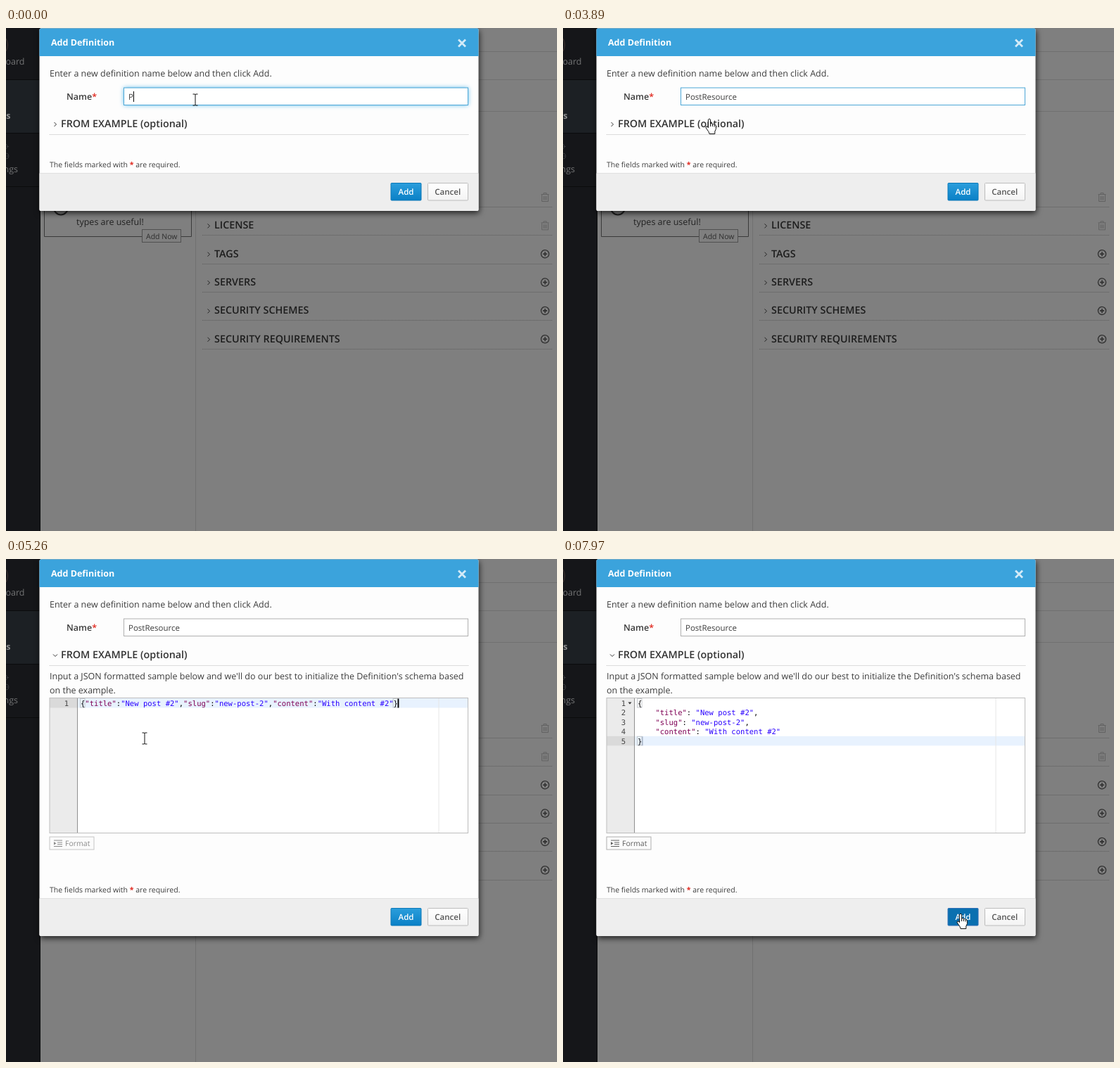
Recreate the animation shown at these times as an HTML page. Size 783x715 px, loop 8000 ms.

```html
<!DOCTYPE html>
<html lang="en">
<head>
<meta charset="utf-8">
<title>Add Definition</title>
<style>
  html, body { margin: 0; width: 783px; height: 715px; overflow: hidden; background: #7f7f7f; }
  svg { display: block; font: 12.5px "Open Sans", sans-serif; text-rendering: geometricPrecision; }
  .h { font-size: 14.35px; font-weight: 600; }
  .s { font-size: 10.5px; }
  .b { font-size: 11.5px; font-weight: 600; }
  .code { font: 10.55px "DejaVu Sans Mono", monospace; }
  .key { fill: #7f0055; }
  .str { fill: #2a00ff; }
  .line { fill: none; stroke-width: 1; }
  .dots { fill: none; stroke-dasharray: 1 1; }
  .req { fill: #e0261c; }
  #shade { filter: drop-shadow(1px 3px 4px rgba(0,0,0,.75)); }
  #glow { filter: drop-shadow(0 0 3px #4fb5ea); }
</style>
</head>
<body>
<svg width="783" height="715" viewBox="0 0 783 715">
  <defs>
    <linearGradient id="blue" x2="0" y2="1"><stop stop-color="#2b9edc"/><stop offset="1" stop-color="#0a80c6"/></linearGradient>
    <linearGradient id="pale" x2="0" y2="1"><stop stop-color="#fff"/><stop offset="1" stop-color="#f3f3f3"/></linearGradient>
    <clipPath id="fold"><rect id="foldBox" x="48" y="152" width="623" height="0"/></clipPath>
    <g id="trash" class="line" stroke="#626262">
      <path d="M-5.5-4H5.5M-2-4V-6H2V-4M-4.5-3.5V6H4.5V-3.5M-2-1.5V4M0-1.5V4M2-1.5V4"/>
    </g>
    <g id="plus" class="line" stroke="#2e2e2e">
      <circle r="5.6" stroke-width="1.3"/><path d="M-3 0H3M0-3V3" stroke-width="1.6"/>
    </g>
  </defs>

  <!-- dimmed page -->
  <rect width="783" height="715" fill="#7f7f7f"/>
  <g class="line" stroke="#717171">
    <path d="M670 33.5H783M670 73.5H783M670 118.5H783M269.5 250V715" stroke="#707070"/>
  </g>
  <g id="rows" fill="#1d1d1d"></g>
  <g class="line" stroke="#3a3a3a">
    <path d="M54.5 240V296.5H263.5V240"/>
    <circle cx="78" cy="255.500" r="10" stroke="#222" stroke-width="2"/>
  </g>
  <text x="100" y="280" fill="#222">types are useful!</text>
  <rect x="193.500" y="286.500" width="55" height="18" fill="#7f7f7f" stroke="#505050"/>
  <text class="s" x="199" y="299.500" fill="#2d2d2d">Add Now</text>

  <!-- sidebar -->
  <rect width="48.500" height="715" fill="#151619"/>
  <rect y="74" width="48" height="75" fill="#1c2024"/>
  <path class="line" stroke="#0a0b0c" d="M0 73.500H48M0 149.500H48M0 225.500H48M48.500 0V715"/>
  <g class="line" stroke="#403431" stroke-width="2">
    <path d="M0 15Q5 24 0 33"/>
    <path d="M0 165A4 4 0 0 1 0 172M0 178A4 4 0 0 1 0 186M1 168.500H4M1 182H4" stroke="#36383a"/>
  </g>
  <g text-anchor="end" fill="#737475">
    <text x="26.500" y="52">Dashboard</text>
    <text x="6.500" y="129" font-weight="700" fill="#8d8e8f">APIs</text>
    <text x="17" y="205">Settings</text>
  </g>

  <!-- dialog -->
  <rect id="shade" x="47.500" y="0.500" width="624" height="259.500" rx="2" fill="#fdfdfd"/>
  <path d="M47.500 40V3Q47.500 .5 50 .5H669Q671.500 .5 671.500 3V40Z" fill="#3ba3dc"/>
  <text x="64" y="25" font-weight="700" fill="#fff">Add Definition</text>
  <path d="M643 16.500L653 26.500M653 16.500L643 26.500" stroke="#d3ebf8" stroke-width="2.800"/>
  <g fill="#3c3c3c">
    <text x="62" y="69">Enter a new definition name below and then click Add.</text>
    <text x="86" y="102" font-weight="600">Name<tspan class="req">*</tspan></text>
    <rect id="glow" x="167.500" y="85" width="489" height="24.500" fill="#fff"/>
    <rect id="field" x="167.500" y="85" width="489" height="24.500" fill="#fff"/>
    <text id="name" x="174" y="102" font-size="11.500"></text>
    <path id="caret" d="M0 90V105" stroke="#000"/>
    <path id="chev" class="line" stroke="#333" stroke-width="1.300" d="M-1.500-3L1.500 0L-1.500 3"/>
    <text class="h" x="78" y="141" fill="#333">FROM EXAMPLE (optional)</text>
    <path class="dots" stroke="#bbb" d="M62 151.500H657"/>
  </g>

  <g clip-path="url(#fold)">
    <text x="62" y="171" fill="#3c3c3c">Input a JSON formatted sample below and we'll do our best to initialize the Definition's schema based</text>
    <text x="62" y="191" fill="#3c3c3c">on the example.</text>
    <rect x="62" y="197.500" width="594.500" height="192" fill="#fff"/>
    <rect x="62" y="197.500" width="40" height="192" fill="#ebebeb"/>
    <g id="active">
      <rect x="62" y="198" width="40" height="13.500" fill="#dadada"/>
      <rect x="102" y="198" width="554.500" height="13.500" fill="#e8f2fe"/>
    </g>
    <path class="line" stroke="#8f8f8f" d="M101.500 198V389"/>
    <path class="line" stroke="#e6e6e6" d="M615 198V389"/>
    <g id="editor" class="code"></g>
    <path id="codeCaret" d="M0 198.500V211.500"/>
    <rect x="62" y="197.500" width="594.500" height="192" fill="none" stroke="#bdbdbd"/>
    <g id="format">
      <rect x="62" y="395" width="63" height="18" stroke="#c2c2c2"/>
      <path class="line" stroke-width="1.400" d="M68 400H80M73 403H80M73 405.700H80M68 408.500H80"/>
      <path stroke="none" d="M68 402L71.500 404.300L68 406.600Z"/>
      <text class="s" stroke="none" x="84" y="408">Format</text>
    </g>
  </g>

  <g id="foot">
    <text class="s" x="62" y="198.300" fill="#3c3c3c">The fields marked with <tspan class="req" font-weight="700">*</tspan> are required.</text>
    <path d="M47.500 206.500H671.500V258Q671.500 260 669.500 260H49.500Q47.500 260 47.500 258Z" fill="#eee"/>
    <path class="line" stroke="#e0e0e0" d="M48 206.500H671"/>
    <rect id="add" x="547" y="220.500" width="43" height="24.500" rx="1" stroke="#0b78b8"/>
    <text class="b" x="568.500" y="237" text-anchor="middle" fill="#fff">Add</text>
    <rect x="599.500" y="220.500" width="57" height="24.500" rx="1" fill="url(#pale)" stroke="#bcbcbc"/>
    <text class="b" x="627.700" y="237" text-anchor="middle" fill="#555">Cancel</text>
  </g>

  <g id="pointer" stroke-linejoin="round">
    <g id="beam" class="line" stroke="#111" stroke-width="1.300">
      <path d="M-3.500-8H-1Q0-8 0-7Q0-8 1-8H3.500M0-7V7M-3.500 8H-1Q0 8 0 7Q0 8 1 8H3.500"/>
    </g>
    <path id="arrow" fill="#fff" stroke="#111" d="M0 0V15.500L3.600 12.200L6 18L8.600 17L6.200 11.300H11Z"/>
    <g id="hand" fill="#fff" stroke="#111">
      <path d="M-1.600 1.200Q0-1 1.600 1.200V7Q3.600 6 4.400 7.600Q6.300 6.900 7.100 8.600Q9 8.200 9.400 10V14.500L7.800 18V21.500H0L-1 18.500L-5 12.800Q-4.800 10 -2.900 11L-1.600 12.700Z"/>
      <path class="line" d="M1.600 7V11M4.400 8V11M7.100 9V11.500"/>
    </g>
  </g>
</svg>
<script>
const LOOP = 8000, ADV = 6.351, LINE = 13.45, CODE_X = 106;
const OPEN = 4040, PASTE = 5120, FORMAT = 6690, PRESS = 7970;
const $ = id => document.getElementById(id);
const set = (id, attrs) => { for (const k in attrs) $(id).setAttribute(k, attrs[k]); };
const show = (id, on) => set(id, { visibility: on ? 'visible' : 'hidden' });
const at = (steps, t) => steps.filter(s => s[0] <= t).pop();

// [time, letters typed]
const typing = [[0, 1], [300, 2], [840, 3], [1250, 4], [1560, 5], [1710, 6],
  [1990, 7], [2130, 8], [2410, 9], [2530, 10], [2800, 12]];
// [time, added dialog height]
const growth = [[0, 0], [OPEN, 200], [4170, 263], [4320, 276]];
// [time, x, y, pointer]
const moves = [
  [0, 269, 102, 'beam'], [3330, 262, 106, 'beam'], [3470, 243, 115, 'arrow'],
  [3610, 224, 127, 'hand'], [3750, 211, 130, 'hand'], [3890, 208, 129, 'hand'],
  [4040, 209, 138, 'hand'], [4170, 213, 157, 'arrow'], [4320, 216, 183, 'arrow'],
  [4450, 218, 202, 'beam'], [4580, 215, 208, 'beam'], [4710, 214, 212, 'beam'],
  [5120, 207, 230, 'beam'], [5260, 197, 255, 'beam'], [5400, 180, 290, 'beam'],
  [5540, 160, 330, 'beam'], [5690, 141, 367, 'beam'], [5830, 123, 399, 'hand'],
  [5980, 110, 411, 'hand'], [6150, 103, 414, 'hand'], [6270, 100, 410, 'hand'],
  [6410, 98, 407, 'hand'], [6550, 98, 406, 'hand'], [6830, 104, 408, 'hand'],
  [6970, 155, 420, 'arrow'], [7110, 255, 448, 'arrow'], [7250, 385, 482, 'arrow'],
  [7390, 490, 500, 'arrow'], [7530, 545, 506, 'arrow'], [7690, 561, 506, 'hand'],
  [7830, 565, 505, 'hand'], [7970, 565, 504, 'hand']];

const compact = ['{"title":"New post #2","slug":"new-post-2","content":"With content #2"}'];
const pretty = ['{', '"title": "New post #2",', '"slug": "new-post-2",', '"content": "With content #2"', '}'];

const paint = s => s.replace(/"[^"]*"(?=(:?))/g,
  (m, colon) => `<tspan class="${colon ? 'key' : 'str'}">${m}</tspan>`);
const bracket = (col, row) =>
  `<rect x="${CODE_X - .5 + col * ADV}" y="${198.5 + row * LINE}" width="6.5" height="12.5" fill="none" stroke="#c4c8cc"/>`;

function editorMarkup(lines) {
  const last = lines.length - 1;
  const text = lines.map((s, i) => {
    const x = CODE_X + (s[0] === '"' ? 4 * ADV : 0), y = 209 + i * LINE;
    return `<text x="89" y="${y}" text-anchor="end" fill="#444">${i + 1}</text><text x="${x}" y="${y}">${paint(s)}</text>`;
  }).join('');
  if (!lines[0]) return text;
  const fold = last ? '<path d="M92.500 203.500H97.500L95 206.500Z" fill="#333"/>' : '';
  return bracket(0, 0) + bracket(lines[last].length - 1, last) + text + fold;
}

let shown;
function setEditor(lines) {
  if (shown === lines) return;
  shown = lines;
  $('editor').innerHTML = editorMarkup(lines);
}

const empty = [''];
function draw(t) {
  $('name').textContent = 'PostResource'.slice(0, at(typing, t)[1]);
  set('caret', { transform: `translate(${174.5 + $('name').getComputedTextLength()})` });
  show('caret', t < 3750);
  show('glow', t < 3890);
  set('field', { stroke: t < OPEN ? '#4ba6d6' : '#b0b0b0' });

  const grow = at(growth, t)[1];
  set('shade', { height: 259.5 + grow });
  set('foot', { transform: `translate(0 ${grow})` });
  set('foldBox', { height: grow === 276 ? 270 : Math.max(0, grow - 15) });
  set('chev', { transform: `translate(70 137) rotate(${grow ? 90 : 0})` });

  const lines = t < PASTE ? empty : t < FORMAT ? compact : pretty;
  setEditor(lines);
  const row = lines.length - 1, focus = t >= 4580 && t < FORMAT;
  set('active', { transform: `translate(0 ${row * LINE})` });
  set('codeCaret', {
    transform: `translate(${CODE_X + .6 + lines[row].length * ADV} ${row * LINE})`,
    stroke: focus ? '#000' : '#8e9db5', 'stroke-width': focus ? 1.8 : 1
  });

  const [, x, y, kind] = at(moves, t);
  set('pointer', { transform: `translate(${x} ${y})` });
  for (const id of ['beam', 'arrow', 'hand']) show(id, id === kind);

  const over = kind === 'hand' && x < 126 && y > 390;
  const ink = t >= FORMAT ? '#5c5c5c' : over ? '#777' : '#8a8a8a';
  set('format', { fill: ink, stroke: ink });
  set('formatBox', { fill: over ? '#ebebeb' : '#fbfbfb', stroke: over || t >= FORMAT ? '#b0b0b0' : '#c6c6c6' });
  const press = t >= PRESS;
  set('add', { fill: press ? '#0a70b0' : kind === 'hand' && x > 546 ? '#0a80c6' : 'url(#blue)', stroke: press ? '#2f6fb5' : '#0b78b8' });
}

$('format').firstElementChild.id = 'formatBox';
$('rows').innerHTML = ['', 'LICENSE', 'TAGS', 'SERVERS', 'SECURITY SCHEMES', 'SECURITY REQUIREMENTS']
  .map((label, i) => {
    const y = 240 + i * 40.35;
    return `<path class="line" stroke="#222" stroke-width="1.200" d="M286.500 ${y - 2}l3 3l-3 3"/>
      <text class="h" x="296" y="${y + 5}">${label}</text>
      <use href="#${i < 2 ? 'trash' : 'plus'}" x="766" y="${y + .5}"/>
      <path class="dots" stroke="#5c5c5c" d="M279 ${Math.round(y + 14) + .5}H776"/>`;
  }).join('');

const start = performance.now();
function tick() {
  draw((performance.now() - start) % LOOP);
  requestAnimationFrame(tick);
}
tick();
</script>
</body>
</html>
```
